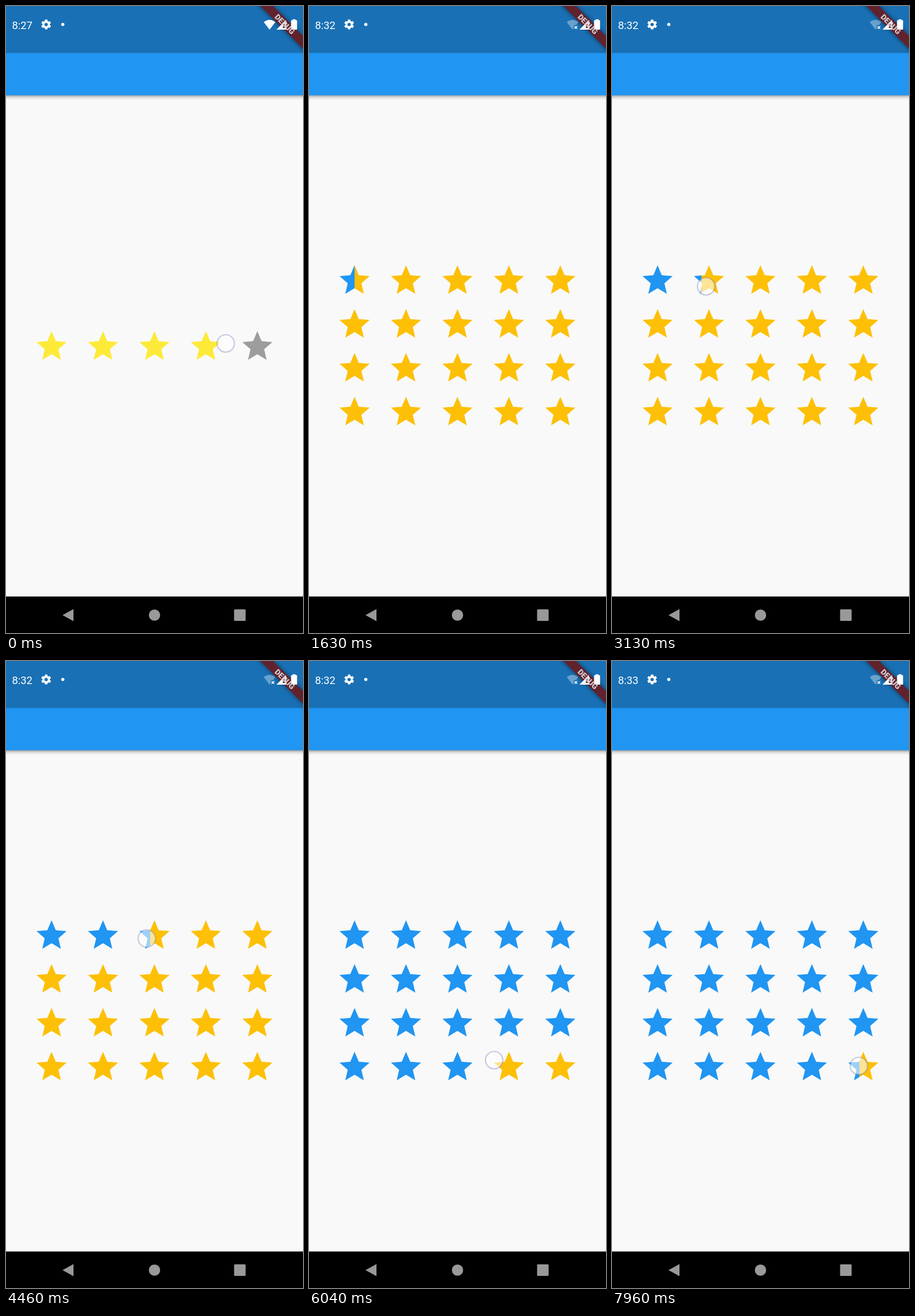
Animation of 515 by 1087 pixels, one loop 8 s. Source, as an HTML page with a canvas:

```html
<!DOCTYPE html>
<html lang="en">
<head>
<meta charset="utf-8">
<title>Star rating</title>
<style>
  html, body { margin: 0; width: 100%; height: 100%; overflow: hidden; background: #f9f9f9; }
  canvas { display: block; width: 515px; height: 1087px; }
</style>
</head>
<body>
<canvas id="stage" width="515" height="1087"></canvas>
<script>
const ctx = document.getElementById('stage').getContext('2d');
const W = 515, H = 1087, LOOP = 8000;
const GRID_START = 1250, TOUCH_START = 2600, MINUTE_TURN = 7000;
const COL_X = 79, COL_STEP = 89.2, ROW_Y = 449.4, ROW_STEP = 76;
const SCALE = 2.61, STAR_W = 20 * SCALE;
const BLUE = '#2095f2', AMBER = '#fdc007', YELLOW = '#fdea38', GREY = '#9d9d9d';
const BAND = '#61222e';

const starPath = new Path2D('M12 17.27L18.18 21l-1.64-7.03L22 9.24l-7.19-.61L12 2 9.19 8.63 2 9.24l5.46 4.73L5.82 21z');
const gearPath = new Path2D('M19.43 12.98c.04-.32.07-.64.07-.98s-.03-.66-.07-.98l2.11-1.65c.19-.15.24-.42.12-.64l-2-3.46c-.12-.22-.39-.3-.61-.22l-2.49 1c-.52-.4-1.08-.73-1.69-.98l-.38-2.65A.49.49 0 0 0 14 2h-4a.49.49 0 0 0-.49.42l-.38 2.65c-.61.25-1.17.59-1.69.98l-2.49-1c-.23-.09-.49 0-.61.22l-2 3.46c-.13.22-.07.49.12.64l2.11 1.65c-.04.32-.07.65-.07.98s.03.66.07.98l-2.11 1.65c-.19.15-.24.42-.12.64l2 3.46c.12.22.39.3.61.22l2.49-1c.52.4 1.08.73 1.69.98l.38 2.65c.03.24.24.42.49.42h4c.25 0 .46-.18.49-.42l.38-2.65c.61-.25 1.17-.59 1.69-.98l2.49 1c.23.09.49 0 .61-.22l2-3.46c.12-.22.07-.49-.12-.64zM12 15.5a3.5 3.5 0 1 1 0-7 3.5 3.5 0 0 1 0 7z');

// time, pointer x, pointer y, fill edge x
const drag = [
  [2600, 84, 484, 79],
  [3130, 163, 486, 155],
  [3750, 252, 482, 252],
  [4460, 244, 481, 250],
  [4950, 292, 515, 288],
  [5450, 330, 610, 328],
  [6040, 321, 692, 320],
  [6900, 366, 698, 364],
  [7960, 428, 702, 429]
];

function dragAt(t) {
  const i = drag.findIndex(k => k[0] > t);
  if (i < 0) return drag[drag.length - 1].slice(1);
  const a = drag[i - 1], b = drag[i];
  const p = (t - a[0]) / (b[0] - a[0]);
  return [1, 2, 3].map(n => a[n] + (b[n] - a[n]) * p);
}

function rect(x, y, w, h, color) {
  ctx.fillStyle = color;
  ctx.fillRect(x, y, w, h);
}

function disc(x, y, r, color) {
  ctx.fillStyle = color;
  ctx.beginPath();
  ctx.arc(x, y, r, 0, 7);
  ctx.fill();
}

function poly(points, color) {
  ctx.fillStyle = color;
  ctx.beginPath();
  points.forEach(p => ctx.lineTo(p[0], p[1]));
  ctx.fill();
}

function icon(path, x, y, scale, color) {
  ctx.save();
  ctx.translate(x, y);
  ctx.scale(scale, scale);
  ctx.fillStyle = color;
  ctx.fill(path, 'evenodd');
  ctx.restore();
}

function star(col, top, part, on, off) {
  const x = COL_X + col * COL_STEP, left = x - STAR_W / 2;
  const cut = left + STAR_W * part;
  const half = (from, to, color) => {
    if (to <= from) return;
    ctx.save();
    ctx.beginPath();
    ctx.rect(from, top - 2, to - from, 56);
    ctx.clip();
    icon(starPath, x - 12 * SCALE, top - 2 * SCALE, SCALE, color);
    ctx.restore();
  };
  half(part > 0 ? cut : left - 1, part < 1 ? left + STAR_W + 1 : cut, off);
  half(left - 1, part > 0 ? cut + (part < 1 ? 0 : 1) : left - 1, on);
}

function pointer(x, y) {
  disc(x, y, 15, 'rgba(255,255,255,.57)');
  ctx.strokeStyle = 'rgba(110,115,175,.36)';
  ctx.lineWidth = 2.2;
  ctx.beginPath();
  ctx.arc(x, y, 15, 0, 7);
  ctx.stroke();
}

function banner() {
  ctx.save();
  ctx.translate(W, 0);
  ctx.rotate(Math.PI / 4);
  ctx.shadowColor = 'rgba(0,0,0,.5)';
  ctx.shadowBlur = 8;
  rect(-60, 36.7, 120, 15.7, BAND);
  ctx.restore();
}

function bannerText() {
  ctx.save();
  ctx.translate(W, 0);
  ctx.rotate(Math.PI / 4);
  ctx.fillStyle = '#d6ccd0';
  ctx.font = '900 13.4px Roboto, sans-serif';
  ctx.textAlign = 'center';
  ctx.fillText('DEBUG', 0, 49.3);
  ctx.restore();
}

function wifi(online) {
  ctx.fillStyle = online ? '#fff' : 'rgba(255,255,255,.35)';
  ctx.beginPath();
  ctx.moveTo(457, 41);
  ctx.lineTo(447, 28);
  ctx.quadraticCurveTo(457, 20, 467, 28);
  ctx.fill();
  if (online) return;
  rect(459, 33, 9, 9, '#1971b5');
  ctx.strokeStyle = '#fff';
  ctx.lineWidth = 1.6;
  ctx.beginPath();
  ctx.moveTo(460.5, 35);
  ctx.lineTo(465, 39.5);
  ctx.moveTo(465, 35);
  ctx.lineTo(460.5, 39.5);
  ctx.stroke();
}

function bars(clock, online) {
  // app bar with its shadow
  const shade = ctx.createLinearGradient(0, 155, 0, 163);
  shade.addColorStop(0, 'rgba(0,0,0,.34)');
  shade.addColorStop(.4, 'rgba(0,0,0,.12)');
  shade.addColorStop(1, 'rgba(0,0,0,0)');
  rect(0, 154, W, 9, shade);
  rect(0, 81, W, 73.7, '#2095f2');
  rect(0, 0, W, 81.5, '#1970b4');
  banner();

  ctx.fillStyle = '#fff';
  ctx.font = '18.35px Roboto, sans-serif';
  ctx.textAlign = 'left';
  ctx.fillText(clock, 10.5, 39.5);
  icon(gearPath, 59.4, 21.9, .85, '#fff');
  disc(98.5, 32, 2.8, '#fff');
  wifi(online);
  poly([[485.5, 24], [485.5, 41], [469, 41]], '#fff');
  poly([[483.5, 30], [483.5, 38], [480, 38], [480, 33.5]], BAND);
  rect(497, 23, 5, 3, '#fff');
  ctx.beginPath();
  ctx.roundRect(494.3, 24.6, 10.4, 16.4, 1.2);
  ctx.fill();
  bannerText();

  // navigation bar
  rect(0, 1023.7, W, H - 1023.7, '#000');
  poly([[98, 1056], [117, 1045.5], [117, 1066.5]], '#999');
  disc(257.5, 1056, 9.8, '#999');
  ctx.fillStyle = '#999';
  ctx.beginPath();
  ctx.roundRect(395.5, 1046, 20, 20, 1.5);
  ctx.fill();
}

function singleRow() {
  for (let c = 0; c < 5; c++) star(c, 563.8, c < 4 ? 1 : 0, YELLOW, GREY);
  pointer(381, 585);
}

function grid(t) {
  const touched = t >= TOUCH_START;
  const [x, y, edge] = touched ? dragAt(t) : [0, 485, COL_X];
  const current = Math.max(0, Math.min(3, Math.round((y - 478) / ROW_STEP)));
  for (let r = 0; r < 4; r++) {
    for (let c = 0; c < 5; c++) {
      const left = COL_X + c * COL_STEP - STAR_W / 2;
      const part = r < current ? 1 : r > current ? 0
        : Math.max(0, Math.min(1, (edge - left) / STAR_W));
      star(c, ROW_Y + r * ROW_STEP, part, BLUE, AMBER);
    }
  }
  if (touched) pointer(x, y);
}

function draw(t) {
  const first = t < GRID_START;
  rect(0, 0, W, H, '#f9f9f9');
  bars(first ? '8:27' : t < MINUTE_TURN ? '8:32' : '8:33', first);
  if (first) singleRow();
  else grid(t);
}

const start = performance.now();
function tick() {
  draw((performance.now() - start) % LOOP);
  requestAnimationFrame(tick);
}
tick();
</script>
</body>
</html>
```
